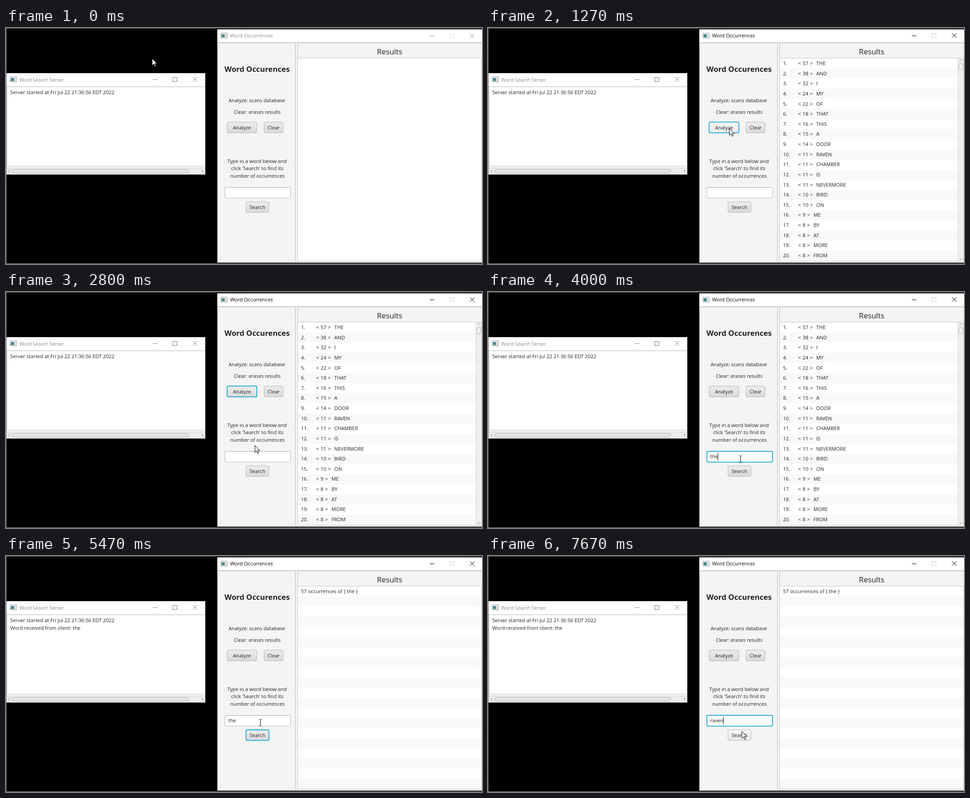
An HTML page for the animation above (8 s loop, 1060 by 528 pixels).

```html
<!DOCTYPE html>
<html lang="en">
<head>
<meta charset="utf-8">
<title>Word Occurrences</title>
<style>
html, body { margin: 0; width: 100%; height: 100%; overflow: hidden; background: #000; }
svg { display: block; width: 1060px; height: 528px; }
text { font: 11.15px "Open Sans", "Noto Sans", sans-serif; fill: #222; white-space: pre; }
.mid { text-anchor: middle; }
.btn .face { fill: url(#face); stroke: #b4b4b4; }
.btn.hover .face { fill: url(#lit); }
.btn.down .face { fill: url(#pressed); }
.ring { fill: none; stroke: #039ed3; stroke-width: 1.5; visibility: hidden; }
.halo { fill: none; stroke: #039ed3; stroke-opacity: .13; visibility: hidden; }
.focus .ring, .focus .halo { visibility: visible; }
.glyph { fill: none; stroke: #777; }
.off { display: none; }
</style>
</head>
<body>
<svg id="stage" viewBox="0 0 1060 528">
  <defs>
    <linearGradient id="face" x2="0" y2="1"><stop stop-color="#ececec"/><stop offset="1" stop-color="#dadada"/></linearGradient>
    <linearGradient id="lit" x2="0" y2="1"><stop stop-color="#f8f8f8"/><stop offset="1" stop-color="#e8e8e8"/></linearGradient>
    <linearGradient id="pressed" x2="0" y2="1"><stop stop-color="#d2d2d2"/><stop offset="1" stop-color="#cacaca"/></linearGradient>
    <linearGradient id="teal" x2="0" y2="1"><stop stop-color="#3b7f9c"/><stop offset="1" stop-color="#4d9a77"/></linearGradient>
  </defs>
</svg>
<script>
const LOOP = 8000, TICK = 200 / 3;
const ROW = 22.63, TOP = 68;
const stage = document.getElementById('stage');

const rect = (x, y, w, h, fill, more = '') =>
  `<rect x="${x}" y="${y}" width="${w}" height="${h}" fill="${fill}" ${more}/>`;
const path = (d, stroke, more = '') => `<path d="${d}" fill="none" stroke="${stroke}" ${more}/>`;
const text = (x, y, s, more = '') =>
  `<text x="${x}" y="${y}" ${more}>${s.replace(/</g, '&lt;')}</text>`;
const mid = (x, y, s, more = '') => text(x, y, s, `class="mid" ${more}`);

const icon = (x, y) =>
  rect(x + .5, y + .5, 14, 11, '#f3f3f3', 'stroke="#9a9a9a"') +
  rect(x + 2, y + 3, 7, 7, 'url(#teal)') +
  rect(x + 10, y + 3, 3, 7, '#d4d4d4');

const controls = (x, y) => `<g class="glyph">
  <path class="ctl" d="M${x} ${y + .5}h10"/>
  <rect class="max" x="${x + 44.5}" y="${y - 4.5}" width="9" height="9"/>
  <path class="ctl" d="M${x + 89} ${y - 5}l10 10m0 -10l-10 10"/></g>`;

const focusRing = (x, y, w, h) =>
  rect(x - .5, y - .5, w + 1, h + 1, '', 'rx="3.5" class="halo"') +
  rect(x + .5, y + .5, w - 1, h - 1, '', 'rx="2.5" class="ring"');

const button = (id, x, y, w, h, label) => `<g id="${id}" class="btn">
  ${rect(x + .5, y + .5, w - 1, h - 1, '', 'rx="2.5" class="face"')}
  ${focusRing(x, y, w, h)}
  ${mid(x + w / 2, Math.floor(y + 17), label)}</g>`;

const stripes = width => Array.from({ length: 10 }, (_, i) =>
  rect(650, TOP + ROW * (2 * i + 1), width, ROW, '#f9f9f9')).join('');

const words = ('57 THE,38 AND,32 I,24 MY,22 OF,18 THAT,16 THIS,15 A,14 DOOR,11 RAVEN,11 CHAMBER,' +
  '11 IS,11 NEVERMORE,10 BIRD,10 ON,9 ME,8 BY,8 AT,8 MORE,8 FROM').split(',');

const wordRow = (entry, i) => {
  const [count, word] = entry.split(' ');
  const y = Math.round(TOP + 15 + ROW * i), shift = count.length > 1 ? 6.3 : 0;
  return text(657, y, i + 1 + '.') + text(690.5, y, '<') + text(700.6, y, count) +
    text(710.6 + shift, y, '>') + text(724.7 + shift, y, word);
};

const listBar = rect(1046, 68, 13, 453, '#efefef') + path('M1046.5 68V521', '#d8d8d8') +
  rect(1048.5, 79.5, 9, 14, '#f0f0f0', 'rx="2" stroke="#b0b0b0"') +
  path('M1050 73.5l3 -3 3 3M1050 515.5l3 3 3 -3', '#888');

const server = rect(1, 101, 443, 227, '#fff') +
  icon(9, 109) + text(29.5, 120, 'Word Search Server', 'style="font-size:10.95px;fill:#8c8c8c"') +
  controls(327, 115) +
  path('M1 131.5H444', '#b8b8b8') + path('M2.5 132V309', '#cfcfcf') +
  rect(1, 309, 443, 18, '#f2f2f2') + path('M2 308.5H443', '#d0d0d0') +
  rect(2, 314, 441, 13, '#ececec') + path('M2 313.5H443', '#d2d2d2') +
  rect(14.5, 316.5, 391, 8, '#e6e6e6', 'rx="3" stroke="#b0b0b0"') +
  path('M9 317l-3.5 3.2 3.5 3.2M436 317l3.5 3.2 -3.5 3.2', '#777') +
  path('M1.5 101V327.5H443.5V101', '#c4c4c4') +
  text(9.5, 148, 'Server started at Fri Jul 22 21:36:56 EDT 2022') +
  `<g id="log">${text(9.5, 165, 'Word received from client: the')}</g>`;

const client = rect(471, 3, 589, 522, '#f4f4f4') + rect(471, 3, 589, 29.5, '#fff') +
  icon(478, 11) + `<g id="bar">${text(499, 21, 'Word Occurrences', 'id="caption" style="font-size:11.1px"')}
  ${controls(944, 17)}</g>` +
  path('M471 32.5H1060', '#d0d0d0') +
  path('M471.5 523V33.5H644.5V523', '#bcbcbc') + path('M649.5 523V33.5H1060', '#bcbcbc') +
  path('M470.5 3V525', '#8a8a8a') +
  mid(559.2, 98, 'Word Occurences', 'style="font-size:16.8px;font-weight:700"') +
  mid(558.5, 166, 'Analyze: scans database') + mid(559.5, 192, 'Clear: erases results') +
  button('analyze', 492, 210, 67, 25, 'Analyze') + button('clear', 574.5, 210, 43, 25, 'Clear') +
  mid(559, 302, 'Type in a word below and') + mid(559.5, 318, "click 'Search' to find its") +
  mid(560, 335, 'number of occurrences') +
  `<g id="field">${rect(487.5, 356.5, 146, 24, '#fff', 'rx="2.5" stroke="#b8b8b8"')}
  ${path('M489 357.5H632', '#e4e4e4')}
  ${focusRing(487, 356, 147, 25)}
  ${text(495, 372, '', 'id="typed"')}
  ${path('M0 360V377', '#000', 'id="caret"')}</g>` +
  button('search', 534, 388.5, 52, 24.5, 'Search') +
  mid(854.3, 59, 'Results', 'style="font-size:16.9px"') +
  rect(649.5, 67.5, 410, 454, '#fff', 'stroke="#c4c4c4"') +
  `<g id="list">${stripes(396)}${words.map(wordRow).join('')}${listBar}</g>` +
  `<g id="found">${stripes(409)}${text(657, TOP + 15, '57 occurrences of { the }')}</g>`;

stage.insertAdjacentHTML('beforeend',
  rect(0, 0, 1060, 528, '#000') + path('M.5 528V.5H1060', '#8a8a8a') + path('M0 527.5H1060', '#b0b0b0') +
  server + client +
  `<path id="arrow" d="M.5 .5V16L4.1 12.6 6.8 18.4 9 17.4 6.4 11.8H11.2Z" fill="#fff" stroke="#000"/>
  <path id="beam" d="M-3 -7.5H-1L0 -6.5 1 -7.5H3M0 -6.5V6.5M-3 7.5H-1L0 6.5 1 7.5H3" fill="none" stroke="#000"/>`);

// Each step changes part of the state at its time.
const steps = [
  [0, { active: false, focus: '', hover: '', down: '', mode: '', typed: '', caret: false, log: false }],
  [530, { hover: 'analyze' }],
  [600, { active: true, focus: 'analyze', down: 'analyze' }],
  [800, { down: '', mode: 'list' }],
  [1330, { hover: '' }],
  [1670, { hover: 'clear', focus: 'clear', down: 'clear' }],
  [1730, { down: '', mode: '' }],
  [2130, { hover: '' }],
  [2200, { hover: 'analyze' }],
  [2400, { focus: 'analyze', down: 'analyze' }],
  [2530, { down: '', mode: 'list' }],
  [2670, { hover: '' }],
  [3200, { focus: 'field', caret: true }],
  [3600, { typed: 't' }],
  [3930, { typed: 'th' }],
  [4000, { typed: 'the' }],
  [4470, { caret: false }],
  [4670, { hover: 'search' }],
  [4800, { focus: 'search', down: 'search' }],
  [4930, { down: '', mode: 'found', log: true }],
  [5200, { hover: '' }],
  [5570, { focus: 'field', caret: true }],
  [5730, { hover: 'search' }],
  [6070, { caret: false }],
  [6270, { typed: '', caret: true }],
  [6800, { caret: false }],
  [7270, { typed: 'r', caret: true }],
  [7400, { typed: 'ra' }],
  [7470, { typed: 'rav' }],
  [7600, { typed: 'rave' }],
  [7670, { typed: 'raven' }]
];

// Pointer path: time, x, y
const route = [
  [0, 325, 68], [200, 360, 95], [400, 490, 190], [600, 539, 227], [1200, 539, 227], [1266, 537, 224],
  [1466, 596, 226], [1866, 596, 226], [2066, 580, 225], [2330, 545, 226], [2600, 548, 226],
  [2800, 554, 343], [3000, 556, 366], [3133, 556, 366], [3400, 562, 374], [4400, 562, 374],
  [4700, 564, 403], [5000, 564, 403], [5330, 566, 374], [5570, 566, 372], [5730, 565, 392], [LOOP, 565, 392]
];

const pointerAt = t => {
  const i = route.findIndex(p => p[0] > t);
  const [t0, x0, y0] = route[i - 1], [t1, x1, y1] = route[i];
  const k = (t - t0) / (t1 - t0);
  return [Math.round(x0 + (x1 - x0) * k), Math.round(y0 + (y1 - y0) * k)];
};

const $ = id => document.getElementById(id);
const show = (id, on) => $(id).classList.toggle('off', !on);

function draw(t) {
  const s = Object.assign({}, ...steps.filter(([at]) => at <= t).map(([, part]) => part));
  for (const id of ['analyze', 'clear', 'search', 'field'])
    for (const kind of ['focus', 'hover', 'down']) $(id).classList.toggle(kind, s[kind] === id);

  $('caption').style.fill = s.active ? '#000' : '#8c8c8c';
  for (const el of $('bar').querySelectorAll('.ctl')) el.style.stroke = s.active ? '#000' : '#888';
  $('bar').querySelector('.max').style.stroke = s.active ? '#ccc' : '#e4e4e4';

  show('list', s.mode === 'list');
  show('found', s.mode === 'found');
  show('log', s.log);
  show('caret', s.caret);
  const typed = $('typed');
  if (typed.textContent !== s.typed) typed.textContent = s.typed;
  const end = s.typed ? typed.getComputedTextLength() : 0;
  $('caret').setAttribute('transform', `translate(${Math.round(495 + end)})`);

  const [x, y] = pointerAt(Math.min(Math.floor((t + 4) / TICK) * TICK, LOOP - 1));
  const inField = x > 487 && x < 634 && y > 356 && y < 381;
  show('arrow', !inField);
  show('beam', inField);
  $('arrow').setAttribute('transform', `translate(${x} ${y})`);
  $('beam').setAttribute('transform', `translate(${x + .5} ${y})`);
}

const start = performance.now();
function frame() {
  draw((performance.now() - start) % LOOP);
  requestAnimationFrame(frame);
}
frame();
</script>
</body>
</html>
```
